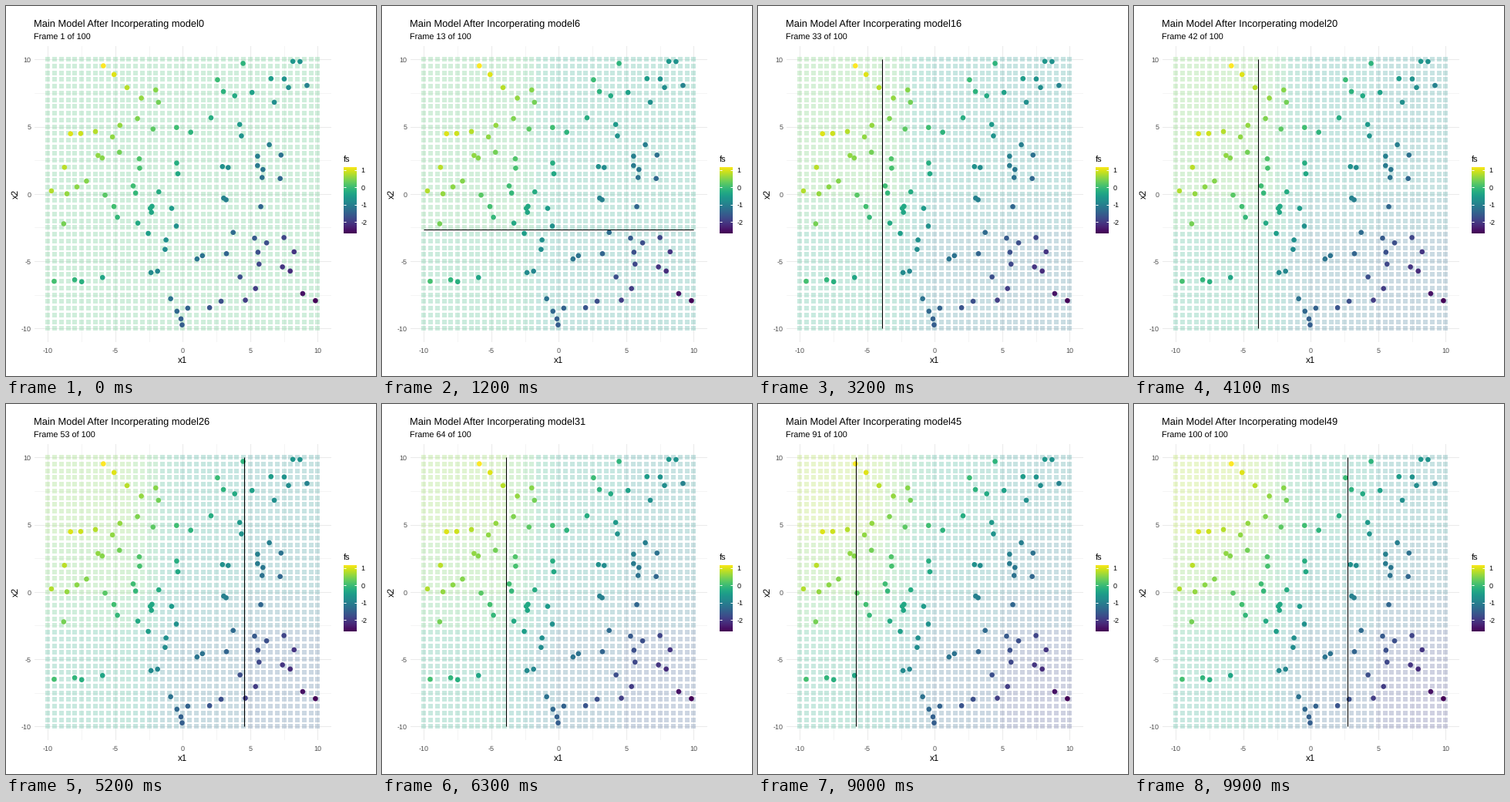
These frames come from a looping animation (480x480 px, 10000 ms). A matplotlib script:

```python
import random

import numpy as np
import matplotlib.pyplot as plt
from matplotlib.animation import FuncAnimation
from matplotlib.colors import Normalize

plt.rcParams.update({"font.family": "Liberation Sans", "text.hinting": "none"})

SIZE, DPI = 480, 72
FRAMES, HOLD = 100, 2
RATE, MIN_LEAF = 0.1, 7
GRAY, TICK_GRAY = "#EBEBEB", "#4D4D4D"
CX, CY, SX, SY = 229.25, 243.75, 17.5, 17.45  # plot centre, pixels per unit
LOW, HIGH = -2.66, 1.16


def r_uniform(seed, n):
    """Uniform numbers as R's runif gives after set.seed(seed)."""
    state = []
    for j in range(675):
        seed = (69069 * seed + 1) % 2**32
        if j > 50:
            state.append(seed)
    rng = random.Random()
    rng.setstate((3, tuple(state) + (624,), None))
    return np.array([rng.getrandbits(32) / 2**32 for _ in range(n)])


pts = (20 * r_uniform(1, 200) - 10).reshape(2, 100).T
fs = -0.57 - 0.13 * pts[:, 0] + 0.10 * pts[:, 1]

side = np.linspace(-10, 10, 41)
grid = np.stack(np.meshgrid(side, side), axis=-1).reshape(-1, 2)


def fit_stump(res):
    """Best least-squares split: (axis, cut, left mean, right mean)."""
    n, total = len(res), res.sum()
    k = np.arange(1, n)
    ok = (k >= MIN_LEAF) & (n - k >= MIN_LEAF)
    best_gain, best = -1, None
    for axis in (0, 1):
        order = np.argsort(pts[:, axis])
        v = pts[order, axis]
        left = np.cumsum(res[order])[:-1]
        gain = np.where(ok, left**2 / k + (total - left)**2 / (n - k), -1)
        i = gain.argmax()
        if gain[i] > best_gain:
            best_gain = gain[i]
            best = (axis, (v[i] + v[i + 1]) / 2,
                    left[i] / k[i], (total - left[i]) / (n - k[i]))
    return best


def boost(steps):
    """Grid predictions and split line after each stump."""
    fit, field = np.zeros(len(pts)), np.zeros(len(grid))
    stages = [(field.copy(), None)]
    for _ in range(steps):
        axis, cut, lo, hi = fit_stump(fs - fit)
        fit += RATE * np.where(pts[:, axis] < cut, lo, hi)
        field += RATE * np.where(grid[:, axis] < cut, lo, hi)
        stages.append((field.copy(), (axis, cut)))
    return stages


stages = boost(FRAMES // HOLD - 1)

fig = plt.figure(figsize=(SIZE / DPI, SIZE / DPI), dpi=DPI, facecolor="white")


def label(x, y, s, size, color="black", va="baseline", **kw):
    return fig.text(x / SIZE, 1 - y / SIZE, s, fontsize=size, color=color,
                    va=va, **kw)


def add_axes(x, y, w, h):
    ax = fig.add_axes([x / SIZE, 1 - (y + h) / SIZE, w / SIZE, h / SIZE])
    ax.axis("off")
    return ax


ax = add_axes(CX - 11 * SX, CY - 11 * SY, 22 * SX, 22 * SY)
ax.set_xlim(-11, 11)
ax.set_ylim(-11, 11)
for t in np.arange(-10, 10.1, 2.5):
    lw = 1.07 if t % 5 == 0 else 0.53
    ax.axvline(t, color=GRAY, lw=lw, zorder=0)
    ax.axhline(t, color=GRAY, lw=lw, zorder=0)

shade = dict(cmap="viridis", norm=Normalize(LOW, HIGH), linewidths=0)
tiles = ax.scatter(*grid.T, s=36, marker="s", c=stages[0][0], alpha=0.25,
                   snap=True, zorder=1, **shade)
ax.scatter(*pts.T, s=44, c=fs, zorder=2, **shade)
split, = ax.plot([], [], color="black", lw=1.07, solid_capstyle="butt", zorder=3)

for t in range(-10, 11, 5):
    label(CX + SX * t, 450, str(t), 9, TICK_GRAY, ha="center")
    label(32.5, CY + 3.8 - SY * t, str(t), 9, TICK_GRAY, ha="right")
label(CX, 463, "x1", 11.5, ha="center")
label(13, CY, "x2", 11.5, ha="center", va="center", rotation=90)

bar = add_axes(438, 209, 17, 86)
bar.imshow(np.linspace(0, 1, 86)[:, None], cmap="viridis", origin="lower",
           aspect="auto", extent=(0, 1, LOW, HIGH), interpolation="nearest")
label(438, 203, "fs", 11)
for t in range(-2, 2):
    for a in (0, 0.8):
        bar.plot([a, a + 0.2], [t, t], color="white", lw=1, solid_capstyle="butt")
    label(460.5, 238.5 - 22.5 * t, str(t), 9)
bar.set_xlim(0, 1)
bar.set_ylim(LOW, HIGH)

title = label(36.5, 27, "", 12.9)
subtitle = label(36.5, 44, "", 10.9)


def update(i):
    k = i // HOLD
    field, line = stages[k]
    title.set_text(f"Main Model After Incorperating model{k}")
    subtitle.set_text(f"Frame {i + 1} of {FRAMES}")
    tiles.set_array(field)
    if line is None:
        split.set_data([], [])
    else:
        axis, cut = line
        ends = [[cut, cut], [-10, 10]]
        split.set_data(*(ends if axis == 0 else ends[::-1]))
    return tiles, split, title, subtitle


anim = FuncAnimation(fig, update, frames=FRAMES, interval=100,
                     repeat=True, repeat_delay=0, blit=False)
plt.show()
```
